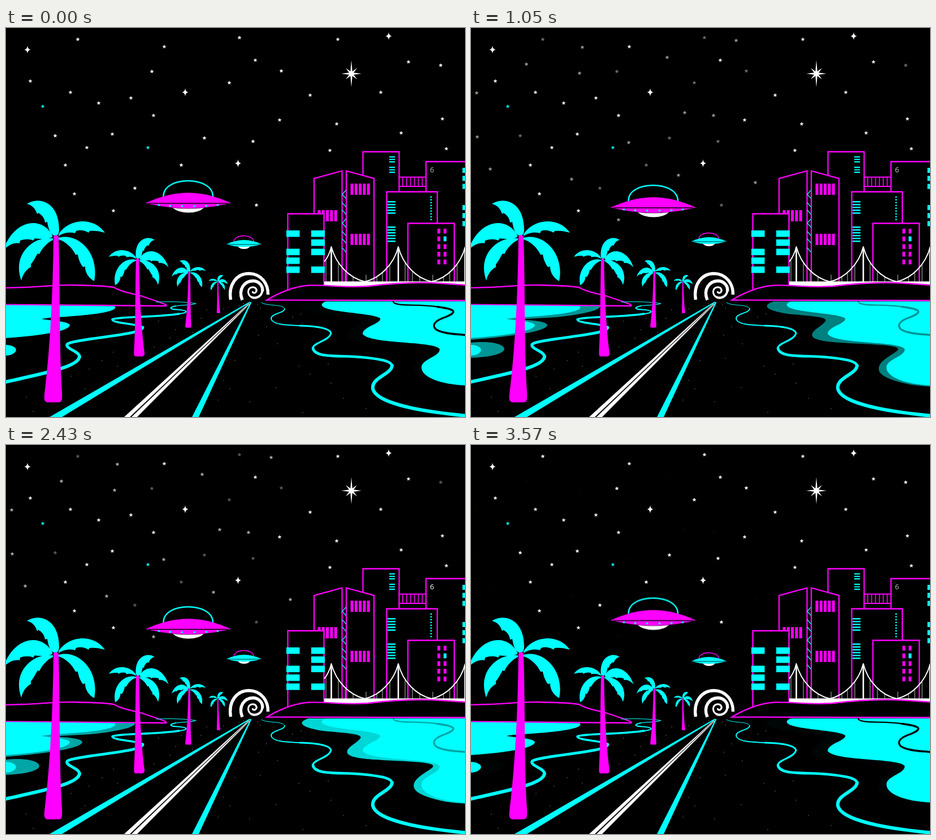
An HTML page that plays this animation: 812x690 px, repeating every 3.6 s.

```html
<!DOCTYPE html>
<html lang="en">
<head>
<meta charset="utf-8">
<title>Neon night drive</title>
<style>
html, body { margin: 0; width: 100%; height: 100%; overflow: hidden; background: #000; }
svg { display: block; }
.c { fill: #0ff; } .m { fill: #f0f; } .w { fill: #fff; }
.cl, .ml, .wl, .kl { fill: none; stroke-linecap: round; stroke-linejoin: round; }
.cl { stroke: #0ff; } .ml { stroke: #f0f; } .wl { stroke: #fff; } .kl { stroke: #000; }
.box { fill: #000; stroke: #f0f; stroke-width: 2.3; }
.flat { stroke-linecap: butt; }
.in { animation: in 3.6s linear infinite; }
.out { animation: out 3.6s linear infinite; }
.tide { animation: tide 1.8s cubic-bezier(.37, 0, .63, 1) -3.45s infinite alternate; }
#big { animation: big 3.6s linear infinite; }
#small { animation: small 3.6s linear infinite; }
#sign { animation: sign 3.6s linear infinite; font: 500 13px "Open Sans", sans-serif; }
@keyframes in { 0%, 100% { opacity: 0; } 50% { opacity: 1; } }
@keyframes out { 0%, 100% { opacity: 1; } 50% { opacity: 0; } }
@keyframes tide { from { opacity: 0; } to { opacity: 1; } }
@keyframes big {
  0%, 100% { transform: translateY(0); }
  9% { transform: translateY(1.4px); }
  19.2% { transform: translateY(4px); }
  29.2% { transform: translateY(8px); }
  42.5% { transform: translateY(13px); }
  50% { transform: translateY(15.8px); }
  56% { transform: translateY(17.2px); }
  67.5% { transform: translateY(16px); }
  78% { transform: translateY(12.4px); }
  87.5% { transform: translateY(7.5px); }
}
@keyframes small {
  0%, 100% { transform: translateY(0); }
  19.2% { transform: translateY(-2.9px); }
  29.2% { transform: translateY(-5px); }
  42.5% { transform: translateY(-6.4px); }
  50% { transform: translateY(-6.6px); }
  67.5% { transform: translateY(-4px); }
  87.5% { transform: translateY(-1.5px); }
}
@keyframes sign { 0%, 100% { opacity: .72; } 19%, 87% { opacity: 1; } 29% { opacity: .82; } 42% { opacity: 1; } }
</style>
</head>
<body>
<svg width="812" height="690" viewBox="0 0 812 690">
<defs>
  <path id="star" d="M0-3.6 1-1.2 3.5-1 1.6.7 2.2 3.2 0 1.8-2.2 3.2-1.6.7-3.5-1-1-1.2Z"/>
  <path id="spark" d="M0-7Q.7-.7 5.5 0 .7.7 0 7-.7.7-5.5 0-.7-.7 0-7Z"/>
  <g id="palm">
    <path class="c" d="M-51-58C-30-72 6-62 6-12C6-4 2 0-3-2C-10-4-13-14-15-26L-19-25C-20-34-26-40-31-42L-33-40C-36-50-42-56-51-58Z
      M5-4C20-30 65-38 87-7C76-10 68-11 60-10L58-7C50-12 42-12 36-10L34-6C24-9 12-6 5-1Z
      M5 2C40-8 78 30 68 79C56 72 52 62 52 53L48 54C42 46 40 38 39 32L35 32C28 18 16 8 5 5Z
      M-6-2C-25-38-75-30-93 25C-84 14-72 10-64 12L-63 7C-54 4-46 4-40 7L-37 3C-28 5-14 4-6 1Z
      M-5 3C-38-2-78 30-61 78C-58 66-52 58-44 54L-44 49C-38 42-36 36-32 30L-29 31C-24 20-14 10-5 6Z"/>
    <path class="m" d="M-4 1C-4-4 4-4 5 1C8 100 6 200 11 275C12 295 10 294 0 294H-10C-20 295-21 290-20 280C-10 200-5 100-4 1Z"/>
  </g>
</defs>

<rect width="812" height="690"/>

<g class="w">
  <g id="steady" opacity=".92"></g>
  <g id="fading" class="out"></g>
  <g id="rising" class="in"></g>
</g>
<g id="tinted" class="c" opacity=".9"></g>
<g class="w">
  <use href="#spark" x="38" y="38.5"/>
  <use href="#spark" x="677" y="14.5"/>
  <use href="#spark" x="317" y="114"/>
  <use href="#spark" x="410.5" y="240"/>
  <path transform="translate(611 81)" d="M0-24 1.7-4 10-10 4-1.7 18 0 4 1.7 10 10 1.7 4 0 24-1.7 4-10 10-4 1.7-18 0-4-1.7-10-10-1.7-4Z"/>
</g>

<!-- saucers -->
<g id="big">
  <path class="cl" stroke-width="2.4" d="M278.500 298C279 262 365 262 366 298"/>
  <path class="m" d="M247 310.500C300 286 345 286 398 310.500C345 323 300 323 247 310.500Z"/>
  <path class="kl" stroke-width="1.3" d="M252 311H393"/>
  <path class="cl" stroke-width="3" d="M270 314h1M290 315.500h1M311 316h1M333 316h1M354 315.500h1M374 314h1"/>
  <path class="w" d="M295 319Q322 322 350 319Q341 327.500 323 327.500T295 319Z"/>
</g>
<g id="small">
  <path class="ml" stroke-width="1.4" d="M403 379C404 365 437 365 438.500 379"/>
  <path class="c" d="M390 383.500C411 373.500 431 373.500 452 383.500C431 390 411 390 390 383.500Z"/>
  <path class="kl" stroke-width=".8" d="M392 384H450"/>
  <path class="w" d="M410 387.500Q421 389 432 387.500Q428 392 421 392T410 387.500Z"/>
</g>

<!-- city -->
<g>
  <path class="box" d="M631.500 452V219.500H695.500V452"/>
  <path class="box" d="M743 452V237H814V452"/>
  <path class="cl flat" stroke-width="10" stroke-dasharray="2.2 2.2" d="M683 227.500V240M683 246V259"/>
  <text id="sign" class="w" x="750" y="255.500">6</text>
  <path class="cl flat" stroke-width="10" stroke-dasharray="9 5.300" d="M812.500 248V290M812.500 314V355"/>
  <path class="ml" stroke-width="2" d="M695 264.500H743M695 281H743"/>
  <path class="ml flat" stroke-width="17" stroke-dasharray="1.600 5.300" d="M701 272.500H743"/>
  <path class="box" d="M673.500 452V290.500H763V452"/>
  <path class="cl flat" stroke-width="14" stroke-dasharray="2.400 2.600" d="M682 307V331.500M682 352V382"/>
  <path class="cl flat" stroke-width="2.600" stroke-dasharray="2.400 2.600" d="M752 298.500V343"/>
  <path class="box" d="M711 456V346.500H793V456"/>
  <path class="ml flat" stroke-width="5" stroke-dasharray="8.500 5.200" d="M765.700 356V421M776.700 356V421"/>
  <path class="c" d="M774.200 369.700h5v8.500h-5z"/>
  <path class="box" d="M545 452V267L594.500 253.500V452M602 452V253.500L651 267V452"/>
  <path class="cl" stroke-width="1.200" d="M601 288l-6 7 6 7M601 317l-6-7M595 323l6 7M601 339l-6 7 6 7M601 368l-6-7M595 374l6 7M601 397l-6-7"/>
  <path class="ml flat" stroke-width="20" stroke-dasharray="5 2.300" d="M609.500 286H644M609.500 375H644M551.500 333H586"/>
  <path class="box" d="M498.500 472V329.500H562.500V472"/>
  <path class="c" d="M496 359h23.500v11.500h-23.500zm0 32.500h23.500v11.500h-23.500zm0 15.500h23.500v11.500h-23.500zm0 16h23.500v11.500h-23.500z
    M540 359h24v11.500h-24zm0 16h24v11.500h-24zm0 16.500h24v11.500h-24zm0 31.500h24v11.500h-24z"/>
</g>

<!-- bridge -->
<path class="w" d="M563 449.500H812V458H563Z"/>
<path class="wl" stroke-width="1.900" d="M563.500 414Q572 403 575.500 388C584 420 608 444 635 450C661 444 686 420 694 388C702 420 726 444 753 450C780 444 804 420 812.500 388"/>
<path class="wl" stroke-width="2.600" d="M575.500 390V452M694 390V452M812 390V452"/>
<path class="wl" stroke-width="1" opacity=".75" d="M566 412V450M588 417V450M600 432V450M614 442V450M637 438V450M656 442V450M666 434V450M679 420V450M706 417V450M719 432V450M732 442V450M755 438V450M774 442V450M785 432V450M798 420V450"/>

<!-- hills -->
<path class="box" d="M461.500 482.500C482 470 510 458 536 456.500C580 456 600 461 640 458C690 452 730 450 770 453L815 456V483.500Z"/>
<path class="box" d="M-4 461L30 460C60 459 90 455.500 120 456C150 457 180 457 192 460.500C205 469 222 470 240 475.500L262 483C276 488 286 491 283 493L-4 490.500Z"/>

<!-- right bay -->
<path class="c tide" d="M535 485C515 492 520 500 560 507C600 511 632 512 627 520C620 530 600 537 604 547C612 560 680 558 735 563C768 567 755 572 740 582C715 598 715 612 740 622C765 632 790 635 812 636V485Z"/>
<path class="c" d="M570 485H812V634C770 632 735 620 735 602C735 587 770 582 767 569C755 555 645 561 631 543C630 530 665 524 662 515C650 505 560 505 558.500 491C560 486 565 485 570 485Z"/>
<g class="kl out">
  <path stroke-width="2.300" d="M685 486C692 495 728 489 763 494.500"/>
  <path stroke-width="3.400" d="M763 494.500C797 499 799 504 777 513C750 522 752 535 775 540C790 544 805 543 814 545"/>
</g>

<!-- left bay -->
<path class="c in" d="M0 491L228 493.500C230 500 200 508 150 513L80 517C110 518 135 521 135 527C134 537 80 547 0 553ZM0 558C40 554 60 562 59 570C56 579 30 584 0 585Z"/>
<path class="c" d="M0 491.500L192 493.500C198 498 186 504 150 508C120 512 75 513 63 516C76 519 112 520 113 527C112 538 60 546 0 550ZM0 562C15 563 20 569 17 574C12 580 5 581 0 581Z"/>

<!-- rivers -->
<g class="cl">
  <path stroke-width="1.200" d="M266 486C290 485 318 486 336 488.500C330 492 312 491 300 493"/>
  <path stroke-width="2.200" d="M300 493C287 496 290 499 303 499.500C324 501 323 505 306 507"/>
  <path stroke-width="3.600" d="M306 507C270 513 195 512 188 517C188 524 236 525 242 531"/>
  <path stroke-width="4.800" d="M242 531C244 545 118 551 108 561C104 569 130 573 130 583"/>
  <path stroke-width="6" d="M130 583C128 602 60 614-4 628.500"/>
  <path stroke-width="1" d="M452 487C462 494 490 489 493 498"/>
  <path stroke-width="1.900" d="M493 498C492 506 470 506 469 515C470 526 495 527 520 528"/>
  <path stroke-width="3.200" d="M520 528C550 529 572 532 575 541C572 555 543 558 543 568"/>
  <path stroke-width="4.600" d="M543 568C546 586 590 580 630 584C660 587 681 590 683 599"/>
  <path stroke-width="6" d="M683 599C681 615 646 620 649 640C655 665 730 680 816 688"/>
</g>

<path id="grit" class="wl" stroke-width="1.300" opacity=".55"/>

<!-- road -->
<path class="c" d="M431 485.500L433 486.500 99 690H77ZM432.500 486L434.500 486.500 341 690H329Z"/>
<path class="w" d="M429 488.500L430 488.800 219 690H209ZM430.500 489L431.500 489.300 232 690H222Z"/>

<!-- vortex -->
<g class="wl flat">
  <path stroke-width="5.400" d="M397.500 482C393 455 408 435.500 430 435.500C452 436 464 454 463.500 473"/>
  <path stroke-width="5.400" d="M418 482.500C410 463 422 449 437 448.500C449 449 455 459 453.500 467"/>
  <path stroke-width="4" d="M453.500 466C452 477 441 481 433.500 477"/>
  <path stroke-width="3" d="M434.500 477.500C426 473 427 462 434.500 460C442 458.500 445 465 442 468.500C440 471 436 470 436.500 467"/>
</g>

<use href="#palm" transform="translate(88 370)"/>
<use href="#palm" transform="translate(233 410) scale(-.587 .587)"/>
<use href="#palm" transform="translate(324 433) scale(.335)"/>
<use href="#palm" transform="translate(375 450) scale(-.19 .19)"/>
</svg>
<script>
const pairs = text => text.split(' ').map(p => p.split(','));
const scatter = (id, text) => {
  document.getElementById(id).innerHTML =
    pairs(text).map(([x, y]) => `<use href="#star" x="${x}" y="${y}"/>`).join('');
};

scatter('steady', '280,33 43,94 114,114 164,133 221,124 261,155 188,188 143,212 105,243 121,294 190,324 441,57 538,119 587,20 712,60 663,114 585,170 484,163 772,161 699,186 779,214 573,217');
scatter('fading', '127,20 413,17 258,77 487,76 395,97 87,191 351,195 437,201 310,243 228,284 443,314 769,66');
scatter('rising', '197,34 98,64 192,80 10,115 11,193 34,250 178,268 261,340 367,261 279,203 378,150 429,155 347,52 469,22 503,274');
scatter('tinted', '65,139 251,212');

const grit = '470,515 461,530 507,513 522,507 447,545 480,560 450,586 518,600 538,614 575,630 478,638 431,663 597,657 525,682 570,596 405,590 385,625 396,640 375,660 637,675 270,520 300,535 345,515 290,550 262,566 190,575 170,590 147,605 140,640 115,618 197,600 36,655 48,680 355,500 310,515 330,540 420,489 412,493 445,491 450,497 424,495 385,498';
document.getElementById('grit').setAttribute('d',
  pairs(grit).map(([x, y]) => `M${x} ${y}h.01`).join(''));
</script>
</body>
</html>
```
